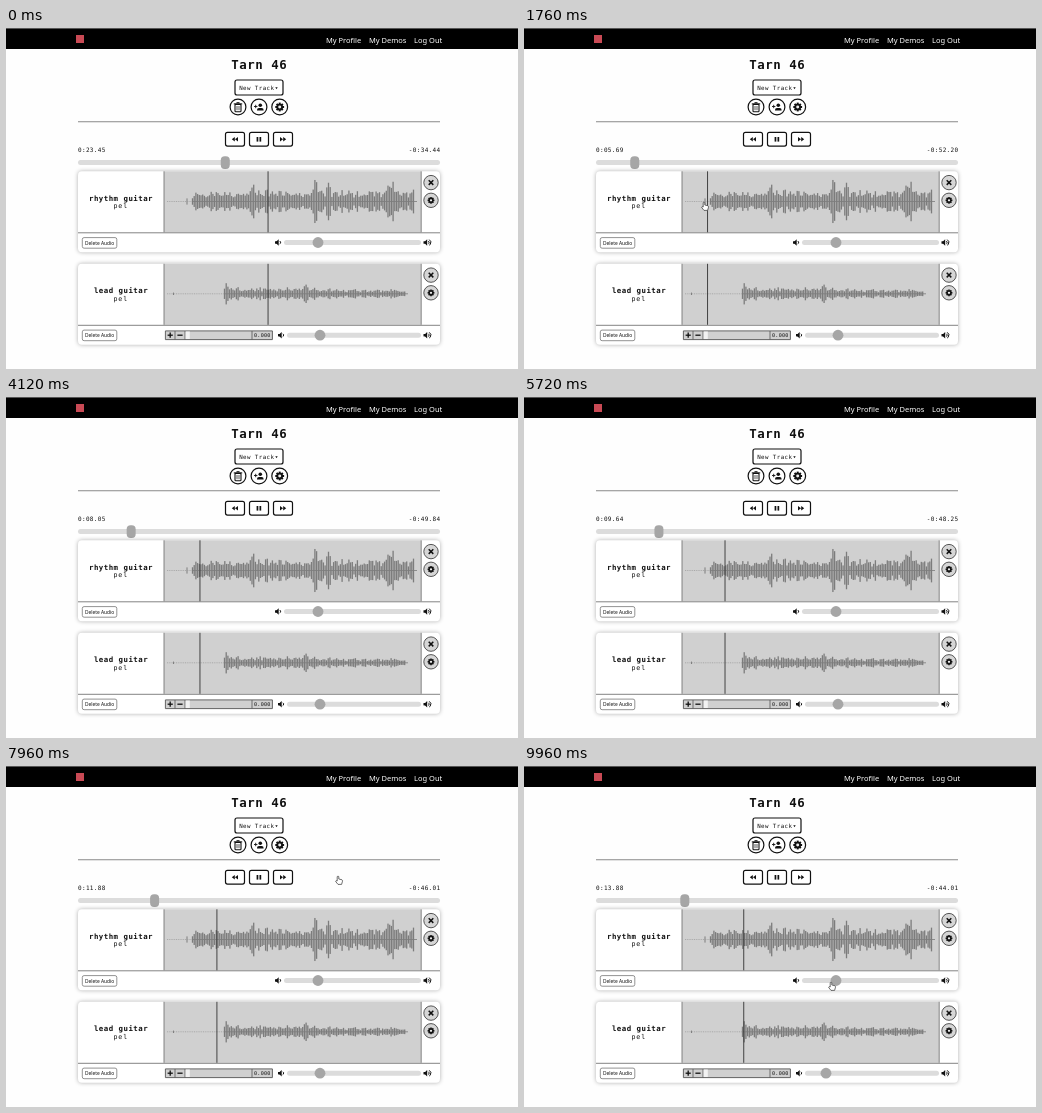
Recreate the animation shown at these times as an HTML page with a canvas. Size 512 by 341 pixels, loop 10 s.

```html
<!DOCTYPE html>
<html lang="en">
<head>
<meta charset="utf-8">
<title>Track mixer</title>
<style>
html, body { margin: 0; width: 100%; height: 100%; overflow: hidden; background: #fefefe; }
canvas { display: block; width: 100vw; height: 100vh; }
</style>
</head>
<body>
<canvas id="stage"></canvas>
<script>
const W = 512, H = 341, LOOP = 10000, STEP = 40, DURATION = 57.89, SEEK_AT = 880;
const INK = '#111', RAIL = '#dcdcdc', THUMB = '#a6a6a6', WAVE_BG = '#d0d0d0', WAVE = '#7c7c7c', EDGE = '#777';
const MONO = '"DejaVu Sans Mono", "Noto Sans Mono", monospace';
const SANS = '"Noto Sans", "Open Sans", sans-serif';

const canvas = document.getElementById('stage');
const scale = window.devicePixelRatio || 1;
canvas.width = W * scale;
canvas.height = H * scale;
const c = canvas.getContext('2d');

const clamp = v => Math.min(1, Math.max(0, v));
const progress = (t, from, to) => clamp((t - from) / (to - from));
const mix = (a, b, p) => a + (b - a) * p;

function randomFrom(seed) {
  return () => (seed = seed * 16807 % 2147483647) / 2147483647;
}

function rect(x, y, w, h, fill) {
  c.fillStyle = fill;
  c.fillRect(x, y, w, h);
}

function paint(fill, stroke, width) {
  if (fill) { c.fillStyle = fill; c.fill(); }
  if (stroke) { c.strokeStyle = stroke; c.lineWidth = width; c.stroke(); }
}

function box(x, y, w, h, r, fill, stroke, width = 1) {
  c.beginPath();
  c.roundRect(x, y, w, h, r);
  paint(fill, stroke, width);
}

function disc(x, y, r, fill, stroke, width = 1) {
  c.beginPath();
  c.arc(x, y, r, 0, Math.PI * 2);
  paint(fill, stroke, width);
}

function triangle(x, y, w, h) {
  c.beginPath();
  c.moveTo(x, y - h);
  c.lineTo(x + w, y);
  c.lineTo(x, y + h);
  paint(INK);
}

function line(x1, y1, x2, y2, color = INK, width = 1) {
  c.beginPath();
  c.moveTo(x1, y1);
  c.lineTo(x2, y2);
  paint(null, color, width);
}

function text(value, x, y, font, { color = INK, align = 'left', spacing = 0 } = {}) {
  c.font = font;
  c.letterSpacing = spacing + 'px';
  c.textAlign = align;
  c.fillStyle = color;
  c.fillText(value, x, y);
}

function gear(x, y, r) {
  for (let i = 0; i < 4; i++) {
    const a = i * Math.PI / 4, dx = Math.cos(a) * r, dy = Math.sin(a) * r;
    line(x - dx, y - dy, x + dx, y + dy, INK, r * 0.46);
  }
  disc(x, y, r * 0.76, INK);
  disc(x, y, r * 0.34, '#eee');
}

function trash(x, y) {
  box(x - 3, y - 2.8, 6, 7.4, 0.8, null, INK, 1.1);
  line(x - 4.2, y - 3.3, x + 4.2, y - 3.3, INK, 1.1);
  line(x - 1.5, y - 4.5, x + 1.5, y - 4.5);
  for (const dx of [-1, 1]) line(x + dx, y - 1.2, x + dx, y + 3, INK, 0.7);
}

function addPerson(x, y) {
  disc(x + 1.3, y - 1.7, 1.8, INK);
  box(x - 2, y + 0.9, 6.6, 2.5, [2, 2, 0, 0], INK);
  line(x - 5, y - 0.5, x - 1.6, y - 0.5, INK, 0.9);
  line(x - 3.3, y - 2.2, x - 3.3, y + 1.2, INK, 0.9);
}

function speaker(x, y, loud) {
  rect(x - 3, y - 1.2, 2, 2.4, INK);
  triangle(x + 0.7, y, -3.4, 3.2);
  for (const r of loud ? [1.7, 3.4] : [1.7]) {
    c.beginPath();
    c.arc(x + 0.9, y, r, -1, 1);
    paint(null, INK, 1);
  }
}

function skipIcon(x, y, dir) {
  for (const shift of [-3, 0.2]) triangle(x + dir * shift, y, dir * 3, 2.2);
}

function header() {
  rect(0, 0, W, 21, '#000');
  rect(0, 0, W, 1, '#555');
  rect(70, 7, 8, 8, '#c94a55');
  const font = `7.5px ${SANS}`, color = '#fff';
  text('My Profile', 320, 15, font, { color });
  text('My Demos', 363, 15, font, { color });
  text('Log Out', 408, 15, font, { color });
}

function toolbar() {
  text('Tarn 46', 253.2, 41, `bold 12.4px ${MONO}`, { align: 'center', spacing: 0.55 });
  box(229, 52, 48, 15, 2, '#fff', INK, 1.2);
  text('New Track', 233.2, 61.6, `5.8px ${MONO}`, { spacing: 0.42 });
  c.save();
  c.translate(270.5, 59.2);
  c.rotate(Math.PI / 2);
  triangle(0, 0, 2, 1.2);
  c.restore();
  for (const x of [232, 253, 273.7]) disc(x, 79, 7.9, '#fff', INK, 1.2);
  trash(232, 79.2);
  addPerson(253, 79);
  gear(273.7, 79, 4.4);
  line(72, 93.7, 434, 93.7, '#888', 1.1);
  for (const x of [219.5, 243.5, 267.5]) box(x, 104.3, 19, 13.8, 2, '#fff', INK, 1.2);
  skipIcon(229, 111.3, -1);
  for (const x of [250.6, 253.5]) rect(x, 109, 1.7, 4.6, INK);
  skipIcon(277, 111.3, 1);
}

function transport(elapsed) {
  const stamp = s => '0:' + s.toFixed(2).padStart(5, '0');
  const font = `6px ${MONO}`, spacing = 0.33;
  text(stamp(elapsed), 72, 124.4, font, { spacing });
  text('-' + stamp(DURATION - elapsed), 434.4, 124.4, font, { spacing, align: 'right' });
  box(72, 132, 362, 5, 2.5, RAIL);
  box(71.5 + elapsed * 6.11, 128.3, 9, 12.6, 4, THUMB);
}

// Loudness is a steady level with a few accents; every bar varies at random.
function waveform({ mid, start, end, level, accents, fade, seed }) {
  const random = randomFrom(seed);
  c.setLineDash([1, 0.8]);
  line(161, mid, start, mid, '#999', 0.7);
  c.setLineDash([]);
  line(start, mid, end + 3, mid, WAVE, 0.8);
  for (let x = start; x <= end; x += 1.7) {
    const pulse = 0.82 + 0.18 * Math.sin(x * 0.9);
    let size = level * mix(1, fade, progress(x, start, end)) * pulse;
    for (const [at, height, width] of accents) size += height * Math.exp(-(((x - at) / width) ** 2));
    size *= mix(0.5, 1.1, random());
    rect(x - 0.65, mid - size, 1.3, size * 2, WAVE);
  }
}

function rhythmWave() {
  line(181, 170.4, 181, 176.6, WAVE);
  waveform({
    mid: 173.5, start: 186.5, end: 408, level: 10, fade: 1.15, seed: 71,
    accents: [[246, 10, 3], [261, 9, 1.5], [309, 13, 3], [322, 9, 2.5], [385, 13, 5]]
  });
}

function leadWave() {
  line(167.5, 264.6, 167.5, 267, WAVE);
  waveform({
    mid: 265.8, start: 218.5, end: 399, level: 7.5, fade: 0.5, seed: 29,
    accents: [[220, 5, 2], [299, 5, 2.5], [348, 3, 2], [388, 2, 3]]
  });
}

function volume(start, thumb, y) {
  speaker(start - 6, y, false);
  box(start, y - 2.5, 415 - start, 5, 2.5, RAIL);
  disc(thumb, y, 5.4, THUMB);
  speaker(420.5, y, true);
}

function card(top, name, playhead, drawWave) {
  const bottom = top + 61;
  c.save();
  c.shadowColor = 'rgba(0,0,0,.32)';
  c.shadowBlur = 4 * scale;
  box(72, top, 362, 81, 4, '#fff');
  c.restore();
  rect(158, top, 257, 61, WAVE_BG);
  drawWave();
  for (const x of [158, 415.2]) line(x, top, x, bottom, EDGE, 0.9);
  line(72, bottom + 0.5, 434, bottom + 0.5, EDGE, 0.9);
  line(playhead, top, playhead, bottom, '#333', 0.9);
  text(name, 115, top + 29.6, `bold 7.4px ${MONO}`, { align: 'center', spacing: 0.47 });
  text('pel', 114.7, top + 36.8, `6.6px ${MONO}`, { align: 'center', spacing: 0.9 });
  box(76.3, top + 66.3, 34.5, 10.6, 1.8, '#fff', EDGE, 0.8);
  text('Delete Audio', 93.6, top + 73.2, `4.85px ${SANS}`, { align: 'center' });
  for (const y of [top + 11.3, top + 29]) disc(425, y, 7.2, '#d6d6d6', '#444', 0.9);
  for (const dir of [-1, 1]) line(425 - 2.3, top + 11.3 - 2.3 * dir, 425 + 2.3, top + 11.3 + 2.3 * dir, INK, 1.5);
  gear(425, top + 29, 3.4);
}

function offsetControl() {
  box(159.4, 302.9, 107, 8.7, 0, WAVE_BG, '#555', 0.9);
  for (const x of [169, 179, 246]) line(x, 303, x, 311.5, '#555', 0.8);
  for (const x of [164.2, 174]) line(x - 2.6, 307.2, x + 2.6, 307.2, INK, 1.3);
  line(164.2, 304.6, 164.2, 309.8, INK, 1.3);
  rect(179.6, 303.5, 4.2, 7.5, '#f2f2f2');
  text('0.000', 256.3, 309.1, `5.1px ${MONO}`, { align: 'center', spacing: 0.25 });
}

function hand(x, y) {
  c.save();
  c.translate(x, y);
  c.beginPath();
  c.moveTo(-0.8, 5);
  c.lineTo(-0.8, 0.6);
  c.quadraticCurveTo(0, -0.5, 0.8, 0.6);
  c.lineTo(0.8, 3);
  c.lineTo(4, 3.8);
  c.quadraticCurveTo(4.7, 4.2, 4.5, 5.2);
  c.lineTo(3.6, 8.4);
  c.lineTo(0, 8.4);
  c.lineTo(-2.4, 5.4);
  c.quadraticCurveTo(-2.2, 4.2, -0.8, 5);
  paint('#fff', '#333', 0.7);
  c.restore();
}

// The pointer seeks in the waveform, leaves, then returns to drag a volume thumb.
function pointer(t, thumb) {
  if (t >= 200 && t < 2000) {
    const enter = progress(t, 200, 800), leave = progress(t, 1760, 2000);
    hand(mix(mix(250, 180, enter), -8, leave), mix(mix(14, 174, enter), 120, leave));
  } else if (t >= 7960) {
    const enter = progress(t, 7960, 8280), rise = progress(t, 9120, 9640);
    hand(mix(mix(332, thumb, enter), 307, rise), mix(mix(110, 309, enter), 216, rise));
  }
}

function draw(t) {
  const elapsed = t < SEEK_AT ? 23.45 + t / 1000 : 3.93 + t * 0.000999;
  const playhead = 158.4 + elapsed * 4.42;
  const leadThumb = mix(314, 302, progress(t, 8480, 8920));
  c.setTransform(canvas.width / W, 0, 0, canvas.height / H, 0, 0);
  rect(0, 0, W, H, '#fefefe');
  header();
  toolbar();
  transport(elapsed);
  card(143.3, 'rhythm guitar', playhead, rhythmWave);
  volume(278, 312, 214.5);
  card(235.8, 'lead guitar', playhead, leadWave);
  offsetControl();
  volume(281, leadThumb, 307.2);
  pointer(t, leadThumb);
}

const start = performance.now();
function tick() {
  const t = (performance.now() - start) % LOOP;
  draw(Math.floor(t / STEP) * STEP);
  requestAnimationFrame(tick);
}
tick();
</script>
</body>
</html>
```
